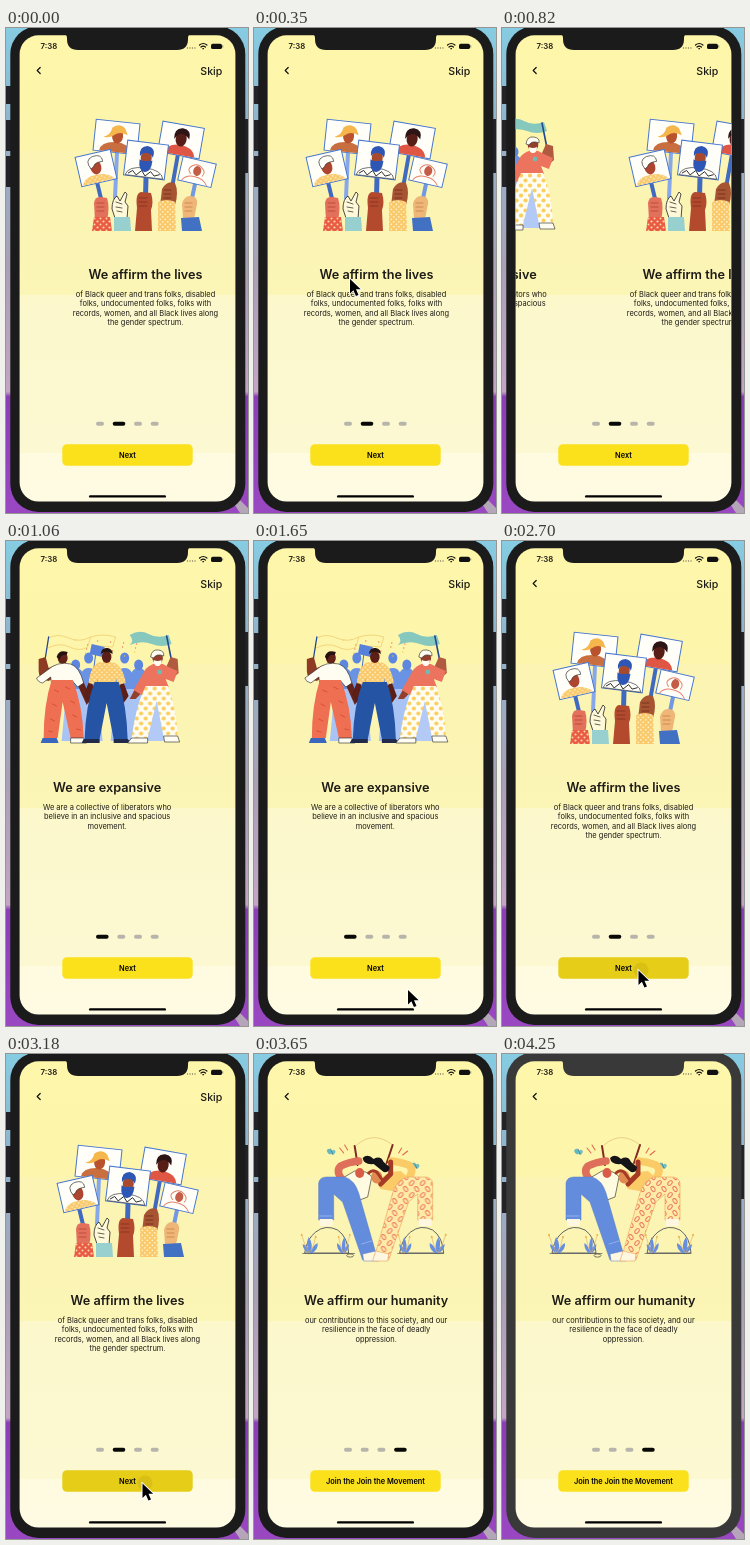
An HTML page for the animation above (4350 ms loop, 242 px wide and 485 px high).

```html
<!DOCTYPE html>
<html lang="en">
<head>
<meta charset="utf-8">
<title>Onboarding</title>
<style>
html, body { margin: 0; width: 100%; height: 100%; overflow: hidden; background: #a9a3bb; }
svg { display: block; width: 100vw; height: 100vh; font-family: Inter, "Open Sans", sans-serif; fill: #1d1b16; }
.title { font-size: 12.7px; font-weight: 600; }
.body { font-size: 7.47px; }
.label { font-size: 7.4px; font-weight: 600; fill: #000; }
.mid { text-anchor: middle; }
.line { fill: none; stroke-linecap: round; stroke-linejoin: round; }
</style>
</head>
<body>
<svg viewBox="0 0 242 485" preserveAspectRatio="none">
  <defs>
    <linearGradient id="wall" x2="0" y2="1">
      <stop offset="0" stop-color="#86cce2"/><stop offset=".2" stop-color="#8fb4cc"/>
      <stop offset=".5" stop-color="#aaa0b4"/><stop offset=".75" stop-color="#c3a5c4"/>
      <stop offset=".76" stop-color="#8a3fb3"/><stop offset="1" stop-color="#9a48c2"/>
    </linearGradient>
    <linearGradient id="paper" gradientUnits="userSpaceOnUse" x1="0" y1="0" x2="0" y2="485">
      <stop offset="0" stop-color="#fef6a9"/><stop offset=".2536" stop-color="#fdf5ab"/>
      <stop offset=".2536" stop-color="#fbf4b2"/><stop offset=".5505" stop-color="#fbf5b6"/>
      <stop offset=".5505" stop-color="#fcf8cc"/><stop offset=".8763" stop-color="#fcf8d2"/>
      <stop offset=".8763" stop-color="#fefbe1"/><stop offset="1" stop-color="#fefbe3"/>
    </linearGradient>
    <clipPath id="screen"><rect x="13.600" y="7.200" width="215.800" height="466.400" rx="19"/></clipPath>
    <pattern id="spots" width="9" height="10" patternUnits="userSpaceOnUse">
      <rect width="9" height="10" fill="#fffdf2"/>
      <circle cx="2.5" cy="2.5" r="2.1" fill="#fbcf5f"/><circle cx="7" cy="7.5" r="2.1" fill="#fbcf5f"/>
    </pattern>
    <pattern id="petals" width="11" height="12" patternUnits="userSpaceOnUse">
      <rect width="11" height="12" fill="#fdeba6"/>
      <g fill="none" stroke="#ee7f66" stroke-width="1.1">
        <ellipse cx="3" cy="3" rx="1.700" ry="2.8" transform="rotate(35 3 3)"/>
        <ellipse cx="8" cy="9" rx="1.700" ry="2.8" transform="rotate(-40 8 9)"/>
      </g>
    </pattern>
    <pattern id="dots" width="5" height="5" patternUnits="userSpaceOnUse">
      <rect width="5" height="5" fill="#f9c96c"/>
      <circle cx="1.3" cy="1.3" r=".9" fill="#fff2c4"/><circle cx="3.8" cy="3.8" r=".9" fill="#fff2c4"/>
    </pattern>
    <pattern id="coral" width="6" height="6" patternUnits="userSpaceOnUse">
      <rect width="6" height="6" fill="#ea5b45"/>
      <circle cx="1.5" cy="1.5" r="1.1" fill="#fbd9a0"/><circle cx="4.5" cy="4.5" r="1" fill="#fbd9a0"/>
    </pattern>
  </defs>
  <rect width="242" height="485" fill="url(#wall)"/>
  <path d="M0 58h6v18h-6zM0 92h6v31h-6zM0 128h6v31h-6zM238 91h4v54h-4z" fill="#222228"/>
  <path d="M227 474l6-3l9 9v5h-8z" fill="#b5a5b8"/>
  <rect id="bezel" x="4.300" y="-2" width="235" height="486" rx="28"/>
  <g clip-path="url(#screen)">
    <rect width="242" height="485" fill="url(#paper)"/>
    <g id="pages"></g>
  </g>
  <path id="notch" d="M57 6h129q-4 0 -4 4v1q0 11 -11 11h-99q-11 0 -11 -11v-1q0 -4 -4 -4z"/>
  <text x="34.500" y="21" font-size="7.8" font-weight="600">7:38</text>
  <g fill="#77745c"><circle cx="181.500" cy="20" r=".65"/><circle cx="184" cy="20" r=".65"/><circle cx="186.500" cy="20" r=".65"/><circle cx="189" cy="20" r=".65"/></g>
  <path class="line" stroke="#111" stroke-width="1.2" d="M193.500 17q3.700-3 7.400 0M195 19q2.200-1.800 4.400 0M196.900 20.700h.6"/>
  <rect x="205" y="15.700" width="11" height="5.400" rx="1.700" fill="#111"/><path d="M216.700 17.400v2" stroke="#555" stroke-width=".8"/>
  <path id="back" class="line" stroke="#111" stroke-width="1.200" d="M34.200 39.500l-3 3l3 3"/>
  <text id="skip" x="194.300" y="46.600" font-size="10.600" font-weight="500">Skip</text>
  <g id="marks"></g>
  <rect id="button" x="56.300" y="416.200" width="130.400" height="21.600" rx="4.500"/>
  <text id="label" class="label mid" x="121.500" y="429.700"></text>
  <rect x="83" y="467.200" width="77" height="2.400" rx="1.200" fill="#000"/>
  <g id="cursor">
    <circle id="ripple" cx="2.500" cy="-.5" r="7.500" fill="#8a7600"/>
    <path d="M0 0v14.500l3.400-3.200l2.500 5.800l2.600-1.100l-2.500-5.700h4.700z" fill="#000" stroke="#fff" stroke-width="1.800" paint-order="stroke"/>
  </g>
</svg>
<script>
const $ = id => document.getElementById(id);
const WIDTH = 217, LOOP = 4350, STEP = 117.6;

const poly = (pts, fill) => `<polygon points="${pts}" fill="${fill}"/>`;
const blob = (d, fill, extra = '') => `<path d="${d}" fill="${fill}" ${extra}/>`;
const line = (d, color, w = 1) => `<path class="line" d="${d}" stroke="${color}" stroke-width="${w}"/>`;
const oval = (x, y, rx, ry, fill, extra = '') =>
  `<ellipse cx="${x}" cy="${y}" rx="${rx}" ry="${ry}" fill="${fill}" ${extra}/>`;
const ink = 'stroke="#222" stroke-width=".6"';

function copy(title, lines) {
  return `<text class="title mid" x="121.5" y="250.600">${title}</text>` + lines.map((s, i) =>
    `<text class="body mid" x="121.5" y="${268.8 + i * 9.4}">${s}</text>`).join('');
}

// A placard with a portrait; (x, y) is its centre.
function placard(x, y, w, h, turn, art) {
  return `<g transform="translate(${x} ${y}) rotate(${turn})"><rect x="${-w / 2}" y="${-h / 2}" width="${w}"
    height="${h}" fill="#fffef8" stroke="#4877cf" stroke-width="1"/>${art}</g>`;
}

function march() {
  const crowd = [[90, 124], [103, 117], [139, 117], [153, 124]].map(([x, y]) =>
    blob(`M${x - 9} 146q0-18 9-18t9 18l5 54h-28z`, '#a9c3f4') +
    blob(`M${x - 10} 148q0-21 10-21t10 21z`, '#6b93e4') + oval(x, y, 4.5, 5.5, '#5d87df')).join('');
  const confetti = Array.from({ length: 16 }, (_, i) =>
    oval(90 + i * 37 % 62, 99 + i * 11 % 17, .6, .8, i % 3 ? '#e9694c' : '#f3bd4f')).join('');
  return crowd + confetti +
    line('M63 97q9-5 20 0t22-1l-3 10q-8 5-18 0t-22 1M105 96q12-4 25 0l-3 10q-10-1-17-1', '#f0cf71', .8) +
    line('M110 113l-3 24', '#4772cc', 1) + poly('106,103 119,106 117,116 104,113', '#5680da') +
    blob('M144 94q10-6 19-1t20 1l3 9q-10 4-20 0t-22 1q5-4 0-10z', '#86c8bd') +
    line('M63 96l-6 38', '#24478f', 1.3) + line('M181 95l7 35', '#24478f', 1.6) +
    // left marcher
    blob('M53 118l7-2l3 11l7-3l5 8l-12 8q-10-1-10-10z', '#8e3b24') +
    blob('M92 144l6-3l7 17l-4 6z', '#642319') + oval(77, 117, 5, 6, '#642319') +
    blob('M62 129q10-9 23-6q9 3 13 19l-6 4l-6-7v4h-20l-1-7l-8 6q-5-1-6-5z', '#fffdf2', ink) +
    blob('M71 116q2-8 11-5l-1 3q-6-1-7 5z', '#25120f') +
    blob('M66 139h21q10 25 11 58h-13l-8-36l-5 36h-14q0-33 8-58z', '#ee6f52') +
    line('M69 149l4 2M80 146l4 2M67 163l4 2M85 160l4 2M65 178l4 2M87 174l4 2M63 190l4 1M91 188l4 1', '#d94f36', 1) +
    blob('M57 197h14l2 5h-18z', '#3a66bd') + blob('M85 197h13l3 5h-16z', '#fffdf2', ink) +
    // middle marcher
    blob('M104 139l-6 15l5 8l7-13zM137 139l6 16l-5 7l-6-13z', '#5c1f17') +
    blob('M103 142q2-19 12-21h11q11 2 14 21l-8 2l-2-8v7h-18v-7l-1 8z', 'url(#dots)') +
    oval(121, 116, 4.8, 6, '#5c1f17') + blob('M115 113q1-7 7-6q5 1 5 6q-6-4-12 0z', '#291511') +
    blob('M109 141h24q8 23 9 57h-14l-7-36l-7 36h-15q1-34 10-57z', '#2554a5') +
    blob('M98 198h16v4h-18zM128 198h14l4 4h-18z', '#222a4b') +
    // right marcher
    blob('M181 125l4-9l7 2l1 14l-8 7l-9-9z', '#b05a40') +
    blob('M151 145l6-5l4 7l-11 11l-6 0z', '#92402d') +
    blob('M160 128q8-8 17-5l8 4l7 3l-4 11l-8-3l3 8h-22l-5 8l-8-5z', '#ec735d') +
    oval(172, 117, 5.3, 6, '#92402d') +
    blob('M165 116q1-8 8-7q6 1 5 6q-7-3-10 2z', '#fffdf2', ink) + blob('M168 119q4 2 8 0q0 6-4 6t-4-6z', '#fffdf2') +
    oval(174, 131, 2.4, 2.4, '#72bab4') + blob('M167 158h8l6 42h-19z', '#b3caf6') +
    blob('M160 145h22q9 22 10 51h-14l-7-36l-9 37h-16q4-32 14-52z', 'url(#spots)') +
    blob('M146 197h16v5h-20zM178 195h14l2 6h-15z', '#fffdf2', ink) +
    copy('We are expansive', ['We are a collective of liberators who', 'believe in an inclusive and spacious', 'movement.']);
}

function placards() {
  const face = (c, x = 0, y = 0) => oval(x, y, 5.5, 7.5, c);
  return line('M93 124l-2 46', '#86a8ea', 4) + line('M154 126l-8 45', '#3f6ac0', 4) +
    placard(92.5, 109, 44, 31, 6,
      blob('M-16 15q1-9 16-10q13 0 17 10z', '#c96e3e') + face('#b9532e', 1, -1) +
      blob('M-13 1q7-2 8-10q7-6 13 0l3 6q-9-3-13 1t-11 3z', '#f5b64c')) +
    placard(157, 112, 42, 31, 10,
      blob('M-15 15q2-9 14-10q15 0 17 10z', '#df5744') + face('#571d17', 0, -1) +
      blob('M-7 0q-2-11 7-12q9 0 8 10q-7-7-12-2z', '#2c1514')) +
    line('M73 154l6 25', '#3f6ac0', 4) + line('M171 156l-5 24', '#7198e0', 4) +
    placard(72, 140, 36, 30, -13,
      blob('M-17 14.500q3-8 15-8q13 0 18 8z', 'url(#dots)') + face('#ad4530', 0, -1) +
      blob('M-5 0q-5-10 4-12q10-1 9 7q-8-1-10 3z', '#fffef8', ink)) +
    placard(173, 144, 34, 24, 13,
      line('M-13 11q3-6 12-6t13 6', '#e5826c', 1) + oval(0, -1, 4, 5, '#c45d46') +
      line('M-6 3q-5-4 0-8q5-4 10 0q5 3 2 8', '#e5826c', 1)) +
    line('M122 150l-1 38', '#3f6ac0', 5) +
    placard(122, 132, 41, 35, 7,
      blob('M-19 17q2-9 19-9t19 9z', '#fffef8', ink) + line('M-16 15l4-3l4 4l5-5l4 5l5-5l4 4l5-2', '#222', .9) +
      face('#a84a2d', 0, -2) + blob('M-6.500 0q3 2 6.500 1t6.500-1q0 12-6.500 12t-6.500-12z', '#2e57b5') +
      blob('M-6.500-3q-2-10 6.500-11q9 1 6.500 11q-2-4-6.500-4t-6.500 4z', '#2e57b5')) +
    // raised hands and sleeves
    blob('M71 192l-1-17q1-7 7-6l6 1q3 9 0 22z', '#e2705a') + line('M73 175h7M73 179h7M73 183h7', '#a93f31', .7) +
    blob('M70 189h16l2 14h-20z', 'url(#coral)') +
    blob('M91 190l-3-9q0-10 5-13l3 5l5-9l2 2l-2 8l3 4l-1 13z', '#fff8d9', 'stroke="#222" stroke-width=".8"') +
    line('M92 174l6 2M92 179l6 1M93 183l5 1', '#222', .7) + poly('90,189 106,189 107,203 90,203', '#98d0cf') +
    blob('M111 203l2-23q-2-15 4-16l10 1q3 10 0 17l1 21z', '#b34a2e') + line('M115 170h8M115 174h8M115 178h8', '#772b1d', .7) +
    blob('M136 178l2-17q5-9 13-6q4 9 0 22z', '#a75433') + line('M140 162h7M140 166h7M140 170h7', '#632819', .7) +
    blob('M134 174q9-4 17 0l1 29h-18z', 'url(#dots)') +
    blob('M159 191l-1-15q2-8 8-8q8 0 7 8l-3 15z', '#efb777') + line('M161 175h7M161 179h7M161 183h7', '#bd7646', .7) +
    poly('157,190 175,189 178,203 158,203', '#4271c4') +
    copy('We affirm the lives', ['of Black queer and trans folks, disabled', 'folks, undocumented folks, folks with',
      'records, women, and all Black lives along', 'the gender spectrum.']);
}

function dance() {
  const leaf = (x, s) => `<g transform="translate(${x} 200) scale(${s} 1)">` +
    blob('M0 0q-8-4-7-11q6 3 7 11zq-3-10 2-17q4 8-2 17zq2-8 8-10q0 7-8 10z', '#668fdf') +
    line('M1 0q5-8 8-19M2 0q-6-8-7-17', '#e0a95c', .6) + oval(9, -19, 1, 1.3, '#f2b650') + oval(-5, -17, 1, 1.3, '#f2b650') + '</g>';
  const rock = x => blob(`M${x} 199q2-14 11-21q10-8 22-2q10 7 11 23z`, '#fbf4b2', 'stroke="#3d4151" stroke-width=".8"');
  const moth = (x, y) => oval(x - 2, y - 1, 2.2, 2.8, '#67b9c0', `transform="rotate(-40 ${x} ${y})"`) +
    oval(x + 2, y, 2, 2.6, '#72c0c3', `transform="rotate(40 ${x} ${y})"`) + line(`M${x - 1} ${y - 2}l2 5`, '#326079', .6);
  // Near leg planted, far leg bent onto the rock; mirrored for the partner.
  const legs = (fill, edge) =>
    blob('M64 166l0-37q1-6 8-6l18 0q10 3 14 16l18 63l-14 4l-20-58l-9-8v26z', fill, edge) +
    poly('65,165 78,165 78,172 65,172', '#fff7df') + blob('M108 200l13-3l3 10h-15z', '#fff7df', edge);
  return rock(50) + rock(145) + leaf(56, -1) + leaf(88, .8) + leaf(151, -.8) + leaf(182, 1) +
    line('M48 199.500h52M143 199.500h46', '#3d4151', .6) + oval(95.5, 201.500, 3.5, 1.6, '#fbf4b2', ink) +
    moth(77, 97) + moth(161, 111) +
    line('M85 94l4 5M90 91l3 5M144 99l3-5M148 101l5-4', '#e36a51', 1.1) +
    line('M102 91q17-15 36 0', '#e6bc77', .7) +
    line('M100 92l3 19M138 91l-6 18', '#832d21', 2) +
    // left dancer
    blob('M88 124l12-7q13-1 17 6l-4 20l-8 3z', '#fffbe0', ink) +
    line('M87 125q-6-8-1-13q8-4 18-5', '#de705b', 7.5) + oval(105, 119, 4.5, 5, '#d95c48') +
    legs('#648cdd', 'stroke="#5078c8" stroke-width=".5"') + line('M65 162h12M107 190l10-3', '#91b0ec', 1) +
    // right dancer
    blob('M122 128q10-11 24-11l9 8l-6 14l-23-4z', '#fbcb68') +
    line('M154 124q6-8 0-13q-8-3-17-4', '#fbcb68', 7.5) +
    `<g transform="matrix(-1 0 0 1 242 0)">${legs('url(#petals)', 'stroke="#efa05f" stroke-width=".6"')}</g>` +
    line('M136 108l0 12l-10 10', '#a53a25', 5) + oval(122, 123, 5.5, 6.5, '#e08a52') +
    blob('M108 104q5-5 11 1q7-4 10 3l6 5q0 6-6 5l-5-4l-5-4q-10 1-11-6z', '#151417') +
    line('M114 119q4-4 8-1l5 7', '#a53a25', 3) +
    copy('We affirm our humanity', ['our contributions to this society, and our', 'resilience in the face of deadly', 'oppression.']);
}

$('pages').innerHTML = [march(), placards(), '', dance()].map(s => `<g>${s}</g>`).join('');
const pages = [...$('pages').children];
const show = (id, on) => $(id).setAttribute('visibility', on ? 'visible' : 'hidden');
const settle = (from, steps) => from * .38 ** steps;

// Scroll position at step k: settle, swipe back, then two taps forward.
function scroll(k) {
  if (k < 6) return WIDTH - settle(18, k);
  if (k < 7) return WIDTH - 20;
  if (k < 18) return settle(141, k - 7);
  if (k < 28) return WIDTH - (k < 22 ? settle(7, k - 18) : 0);
  return 3 * WIDTH - settle(12, k - 28);
}

function pointer(k) {
  if (k >= 2 && k < 5) return [96, 251];
  if (k < 12 || k > 28) return null;
  return [[213, 412], [184, 440], [154, 449], [139, 433]][k - 12] || (k < 28 ? [136.5, 429.5] : [146, 440]);
}

function draw(t) {
  const k = Math.floor((t + 6) / STEP), pos = scroll(k), page = Math.round(pos / WIDTH);
  pages.forEach((g, i) => g.setAttribute('transform', `translate(${i * WIDTH - pos})`));
  show('back', page > 0);
  show('skip', page < 3);

  let x = 90;
  $('marks').innerHTML = pages.map((_, i) => {
    const on = i === page, w = on ? 12.6 : 8;
    const dot = `<rect x="${x}" y="393.800" width="${w}" height="4" rx="2" fill="${on ? '#080806' : '#b7b5ab'}"/>`;
    x += w + 8.7;
    return dot;
  }).join('');

  const pressed = [17, 23, 24, 27].includes(k);
  $('button').setAttribute('fill', pressed ? '#e6cd18' : '#fbe11c');
  $('label').textContent = page === 3 ? 'Join the Join the Movement' : 'Next';

  const tip = pointer(k);
  show('cursor', tip);
  $('ripple').setAttribute('opacity', pressed ? .15 : 0);
  if (tip) $('cursor').setAttribute('transform', `translate(${tip})`);

  const shell = t >= 4250 ? '#393939' : '#1b1b1c';
  $('bezel').setAttribute('fill', shell);
  $('notch').setAttribute('fill', shell);
}

function tick(now) {
  draw(now % LOOP);
  requestAnimationFrame(tick);
}
draw(0);
requestAnimationFrame(tick);
</script>
</body>
</html>
```
